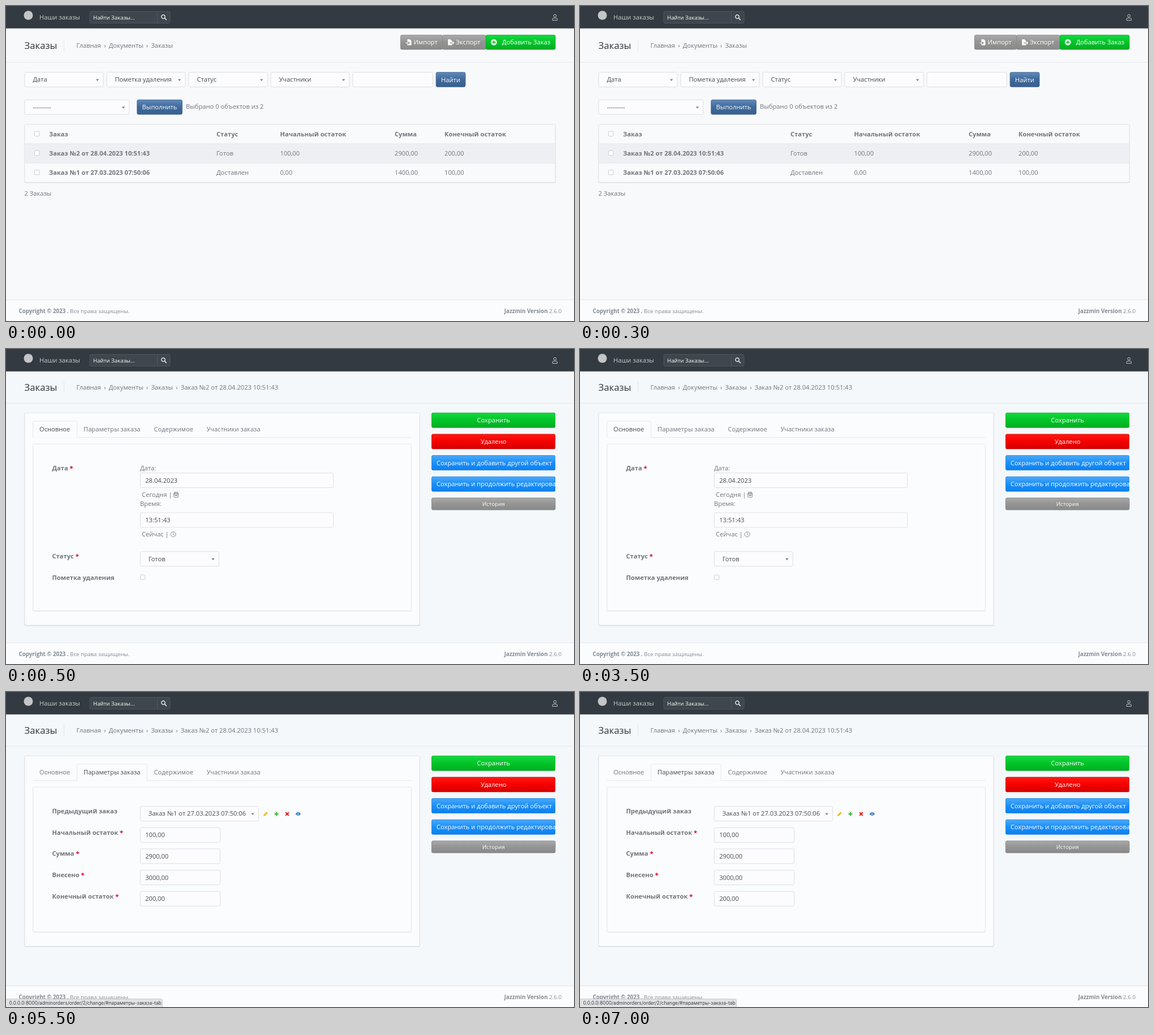
Animation of 1004x558 px, one loop 8 s. Source, as an HTML page:

```html
<!DOCTYPE html>
<html lang="ru">
<head>
<meta charset="utf-8">
<title>Заказы</title>
<style>
html, body { margin: 0; width: 100%; height: 100%; overflow: hidden; background: #f8f9fb; }
svg { display: block; width: 1004px; height: 558px; }
text { font: 11.16px "Open Sans", "Noto Sans", sans-serif; fill: #70757b; white-space: pre; }
.b { font-weight: 700; }
.dark { fill: #454a50; }
.white { fill: #fff; }
.title { font-size: 16.74px; fill: #30353a; }
.small { font-size: 9.76px; }
.foot { font-size: 9.76px; fill: #838b93; }
.url { font-family: Inter, Roboto, sans-serif; font-size: 8.37px; fill: #3c4043; }
</style>
</head>
<body>
<svg id="stage" viewBox="0 0 1004 558" xmlns="http://www.w3.org/2000/svg"></svg>
<script>
const LOOP = 8000;
const EDGE = '#d5d8dc';

const rect = (x, y, w, h, fill, stroke = 'none', r = 0) =>
  `<rect x="${x}" y="${y}" width="${w}" height="${h}" rx="${r}" fill="${fill}" stroke="${stroke}" stroke-width=".8"/>`;

// y is the middle of the capitals
const text = (x, y, str, cls = '', anchor = 'start', drop = 4) =>
  `<text x="${x}" y="${y + drop}" class="${cls}" text-anchor="${anchor}">${str}</text>`;

const line = (x1, y1, x2, y2, color = '#dfe3e7', w = .8) =>
  `<path d="M${x1} ${y1}L${x2} ${y2}" stroke="${color}" stroke-width="${w}"/>`;

const icon = (x, y, body) => `<g transform="translate(${x} ${y})">${body}</g>`;

const stroke = (d, color, w = 1) =>
  `<path d="${d}" fill="none" stroke="${color}" stroke-width="${w}" stroke-linecap="round" stroke-linejoin="round"/>`;

const gradient = (id, a, b, c) =>
  `<linearGradient id="${id}" x2="0" y2="1"><stop stop-color="${a}"/><stop offset=".5" stop-color="${b}"/><stop offset="1" stop-color="${c}"/></linearGradient>`;

const defs = `<defs>
  ${gradient('gray', '#a9a9a9', '#949494', '#898989')}
  ${gradient('green', '#13da3e', '#02c429', '#00ae20')}
  ${gradient('red', '#ff1a12', '#f50000', '#d40000')}
  ${gradient('blue', '#4aa8fb', '#1b8ff8', '#0b80ee')}
  ${gradient('navy', '#5f8abb', '#40699a', '#375f90')}
  <clipPath id="side"><rect x="752" y="100" width="219" height="200"/></clipPath>
</defs>`;

const borders = { gray: '#868686', green: '#05a526', red: '#c80606', blue: '#1880dd', navy: '#345a87' };

const button = (x, y, w, h, tone) =>
  rect(x + .4, y + .4, w - .8, h - .8, `url(#${tone})`, borders[tone], 2.5);

const field = (x, y, w, str = '') =>
  rect(x, y, w, 26, '#fcfcfe', EDGE, 2.6) + (str && text(x + 9, y + 13, str, 'dark'));

const select = (x, y, w, str) =>
  rect(x, y, w, 26, '#fcfcfe', EDGE, 2.6) + text(x + 14.5, y + 12.8, str, 'dark') +
  `<path d="M${x + w - 13.3} ${y + 12}h5.6l-2.8 3.6z" fill="#888"/>`;

const check = (x, y) => rect(x, y - 4.2, 8.4, 8.4, '#fff', '#bfc2c6', 1.6);

const label = (y, str, required = true) =>
  text(81.5, y, str + (required ? ' <tspan fill="#e4002b">*</tspan>' : ''), 'b');

const magnifier = icon(278, 19, '<circle r="3.2" fill="none" stroke="#e2e4e6" stroke-width="1.5"/>' + stroke('M2.5 2.5L5.3 5.3', '#e2e4e6', 1.7));
const person = icon(970.3, 20,
  '<circle cy="-2.6" r="2.3" fill="none" stroke="#c6c9cc"/>' +
  stroke('M-4.2 5V3.6Q-4.2 1.4 -2 1.4H2Q4.2 1.4 4.2 3.6V5Z', '#c6c9cc'));

const header = () =>
  rect(0, 0, 1004, 39.7, '#343a41') +
  '<circle cx="39.5" cy="16.5" r="8" fill="#c3c5c7"/>' +
  text(59, 20, 'Наши заказы').replace('<text', '<text style="fill:#c9cccf"') +
  rect(148, 9.6, 142, 20.8, '#40464d', '#555b62', 2.5) + line(267.5, 9.6, 267.5, 30.4, '#555b62') +
  text(154, 20, 'Найти Заказы...', 'small white', 'start', 3.6) + magnifier + person;

const footer = () =>
  rect(0, 520.4, 1004, 38, '#fbfcfd') + line(0, 520.4, 1004, 520.4) +
  text(22.5, 540, '<tspan class="b">Copyright © 2023 .</tspan> Все права защищены.', 'foot', 'start', 3.5) +
  text(982, 540, '<tspan class="b">Jazzmin Version</tspan> 2.6.0', 'foot', 'end', 3.5);

const heading = (y, edge, crumbs) =>
  text(32.5, y, 'Заказы', 'title', 'start', 6) + line(102.5, y - 10, 102.5, y + 10) +
  text(124.5, y, crumbs.join('  ›  ').replace(/  /g, '<tspan dx="2.2"> </tspan>')) +
  line(0, edge, 1004, edge);

const sheet = 'M-2.5 -5.2H1.8L4.6 -2.4V5.2H-2.5Z';
const fileIn = `<path d="${sheet}" fill="#fff"/>` + stroke('M-5.2 1.2H1M-.8 -.8L1.2 1.2L-.8 3.2', '#8f8f8f', 1.2) + stroke('M-5 1.2H-2.8', '#fff', 1.3);
const fileOut = `<path transform="translate(-2.2)" d="${sheet}" fill="#fff"/>` + stroke('M-1.2 1.2H2', '#8f8f8f', 1.2) + stroke('M2.6 1.2H5.4M3.8 -.8L5.8 1.2L3.8 3.2', '#fff', 1.2);
const plusDot = '<circle r="5.4" fill="#fff"/>' + stroke('M-2.7 0H2.7M0 -2.7V2.7', '#06bd2a', 1.6);

function listPage() {
  const cols = [76, 372, 484.5, 687, 775];
  const rows = [
    ['Заказ', 'Статус', 'Начальный остаток', 'Сумма', 'Конечный остаток'],
    ['Заказ №2 от 28.04.2023 10:51:43', 'Готов', '100,00', '2900,00', '200,00'],
    ['Заказ №1 от 27.03.2023 07:50:06', 'Доставлен', '0,00', '1400,00', '100,00']
  ];
  const table = rows.map((row, i) => {
    const y = 226.7 + i * 34.2;
    return check(50.5, y - .3) +
      row.map((str, j) => text(cols[j], y, str, i && j ? '' : 'b')).join('');
  }).join('');
  const filters = ['Дата', 'Пометка удаления', 'Статус', 'Участники']
    .map((str, i) => select(32.9 + i * 145, 117.4, 139.2, str)).join('');

  return rect(0, 0, 1004, 558, '#f8f9fb') +
    heading(70, 99.8, ['Главная', 'Документы', 'Заказы']) +
    button(697, 51, 75, 26.4, 'gray') + button(771, 51, 78, 26.4, 'gray') + button(848, 51, 123.4, 26.4, 'green') +
    icon(712, 64.2, fileIn) + icon(786, 64.2, fileOut) + icon(862.4, 64.2, plusDot) +
    text(720.5, 64.3, 'Импорт', 'white') + text(795, 64.3, 'Экспорт', 'white') + text(876.7, 64.3, 'Добавить Заказ', 'white') +
    filters + field(612.9, 117.4, 141.5) +
    button(759.8, 117, 52.6, 26.6, 'navy') + text(786, 130.6, 'Найти', 'white', 'middle') +
    select(32.9, 166.2, 185, '---------') +
    button(231.4, 165.8, 80.4, 26.6, 'navy') + text(271.5, 179.4, 'Выполнить', 'white', 'middle') +
    text(318, 178.2, 'Выбрано 0 объектов из 2') +
    rect(32.6, 210.6, 939, 103, '#d9dbde', 'none', 2.5) +
    rect(32.9, 209.6, 938.2, 102.8, '#f9fafc', '#dcdee1', 2.5) +
    rect(33.3, 244, 937.4, 34.2, '#eeeff2') +
    line(33, 244, 971, 244) + line(33, 278.2, 971, 278.2) +
    table + text(32.5, 332.2, '2 Заказы');
}

const tabs = [
  ['Основное', 47.6, 125.6, 59],
  ['Параметры заказа', 125.6, 249.4, 137],
  ['Содержимое', 249.4, 343, 261.4],
  ['Участники заказа', 343, 462, 354.4]
];

const sideButtons = [
  ['Сохранить', 112.8, 'green'], ['Удалено', 150.5, 'red'],
  ['Сохранить и добавить другой объект', 188.2, 'blue'],
  ['Сохранить и продолжить редактирование', 225.8, 'blue']
];

function formPage(active, bottom, boxBottom, body) {
  const [, x1, x2] = tabs[active];
  const side = sideButtons.map(([str, y, tone]) =>
    button(752, y, 219.4, 26.8, tone) +
    (tone === 'blue' ? text(761, y + 13.6, str, 'white') : text(861.7, y + 13.6, str, 'white', 'middle'))).join('');

  return rect(0, 0, 1004, 558, '#f4f8fb') +
    heading(68, 96, ['Главная', 'Документы', 'Заказы', 'Заказ №2 от 28.04.2023 10:51:43']) +
    rect(32.5, 114, 699.2, bottom - 113, '#d5d8db', 'none', 2.5) +
    rect(32.9, 113, 698.4, bottom - 113, '#fbfcfe', '#d9dcdf', 2.5) +
    line(47.6, 156.8, 716.6, 156.8) +
    `<path d="M${x1} 157.4V130Q${x1} 127.8 ${x1 + 2.4} 127.8H${x2 - 2.4}Q${x2} 127.8 ${x2} 130V157.4" fill="#fbfcfe" stroke="#dfe3e7" stroke-width=".8"/>` +
    tabs.map(([str, , , x], i) => text(x, 142.4, str, i === active ? 'dark' : '')).join('') +
    rect(47.6, 169.2, 669, boxBottom - 168.4, '#d5d8db', 'none', 2) +
    rect(47.8, 168.4, 668.6, boxBottom - 168.4, '#fbfcfe', '#e1e4e7', 2) +
    `<g clip-path="url(#side)">${side}</g>` +
    button(752, 263.4, 219.4, 22, 'gray') + text(861.7, 274.7, 'История', 'small white', 'middle', 3.5) +
    body;
}

const calendar = rect(-3.8, -3.4, 7.6, 8, 'none', '#666b70', .8) + stroke('M-3.8 -1.2H3.8M-1.8 -5V-3M1.8 -5V-3', '#666b70', 1) + stroke('M-1.8 1.4H1.8', '#666b70', 1.3);
const clock = '<circle r="4.5" fill="none" stroke="#7b8086" stroke-width=".9"/>' + stroke('M0 -2.6V.2L1.6 1.4', '#7b8086', .9);

const mainTab = () => formPage(0, 489.4, 464,
  label(211, 'Дата') + text(237, 211, 'Дата:') + field(237.2, 219.6, 341.4, '28.04.2023') +
  text(240, 257.8, 'Сегодня |') + icon(300.6, 258, calendar) +
  text(237, 274.3, 'Время:') + field(237.2, 290, 341.4, '13:51:43') +
  text(240, 328, 'Сейчас |') + icon(295.6, 328.3, clock) +
  label(367.2, 'Статус') + select(237.2, 358.8, 139.2, 'Готов') +
  label(404.8, 'Пометка удаления', false) + check(237.4, 404.4));

const tools = () =>
  icon(459, 216, '<path d="M-4 4L-3.3 1.2L1.6 -3.7L3.7 -1.6L-1.2 3.3Z" fill="#efb81c"/>') +
  icon(478, 216, stroke('M-2.8 0H2.8M0 -2.8V2.8', '#35b82c', 1.9)) +
  icon(497, 216, stroke('M-2.3 -2.3L2.3 2.3M2.3 -2.3L-2.3 2.3', '#dd1f1f', 2)) +
  icon(516.4, 216, '<path d="M-4.7 0Q0 -6.4 4.7 0Q0 6.4 -4.7 0Z" fill="#2a6fc0"/><circle r="2" fill="#fff"/><circle r="1.3" fill="#2a6fc0"/>');

function paramsTab() {
  const amounts = [['Начальный остаток', '100,00'], ['Сумма', '2900,00'], ['Внесено', '3000,00'], ['Конечный остаток', '200,00']];
  return formPage(1, 450.4, 425,
    label(211, 'Предыдущий заказ', false) + select(237.2, 202.6, 209.4, 'Заказ №1 от 27.03.2023 07:50:06') + tools() +
    amounts.map(([name, sum], i) => {
      const y = 248.6 + i * 37.65;
      return label(y, name) + field(237.2, y - 8.3, 141.4, sum);
    }).join(''));
}

const statusBar = () =>
  rect(-3, 543.8, 279.4, 20, '#e1e3e5', '#bcbfc2', 2.5) +
  text(5.5, 551, '0.0.0.0:8000/adminorders/order/2/change/#параметры-заказа-tab', 'url', 'start', 3);

const scenes = [
  { start: 0, draw: () => listPage() + header() + footer() },
  { start: 500, draw: () => mainTab() + header() + footer() },
  { start: 5500, draw: () => paramsTab() + header() + footer() + statusBar() }
];

const stage = document.getElementById('stage');
stage.innerHTML = defs + scenes.map(s => `<g visibility="hidden">${s.draw()}</g>`).join('');
const layers = [...stage.children].slice(1);

function update(ms) {
  const t = ms % LOOP;
  const current = scenes.filter(s => t >= s.start).length - 1;
  layers.forEach((g, i) => g.setAttribute('visibility', i === current ? 'visible' : 'hidden'));
}

const begin = performance.now();
function tick() {
  update(performance.now() - begin);
  requestAnimationFrame(tick);
}
tick();
</script>
</body>
</html>
```
